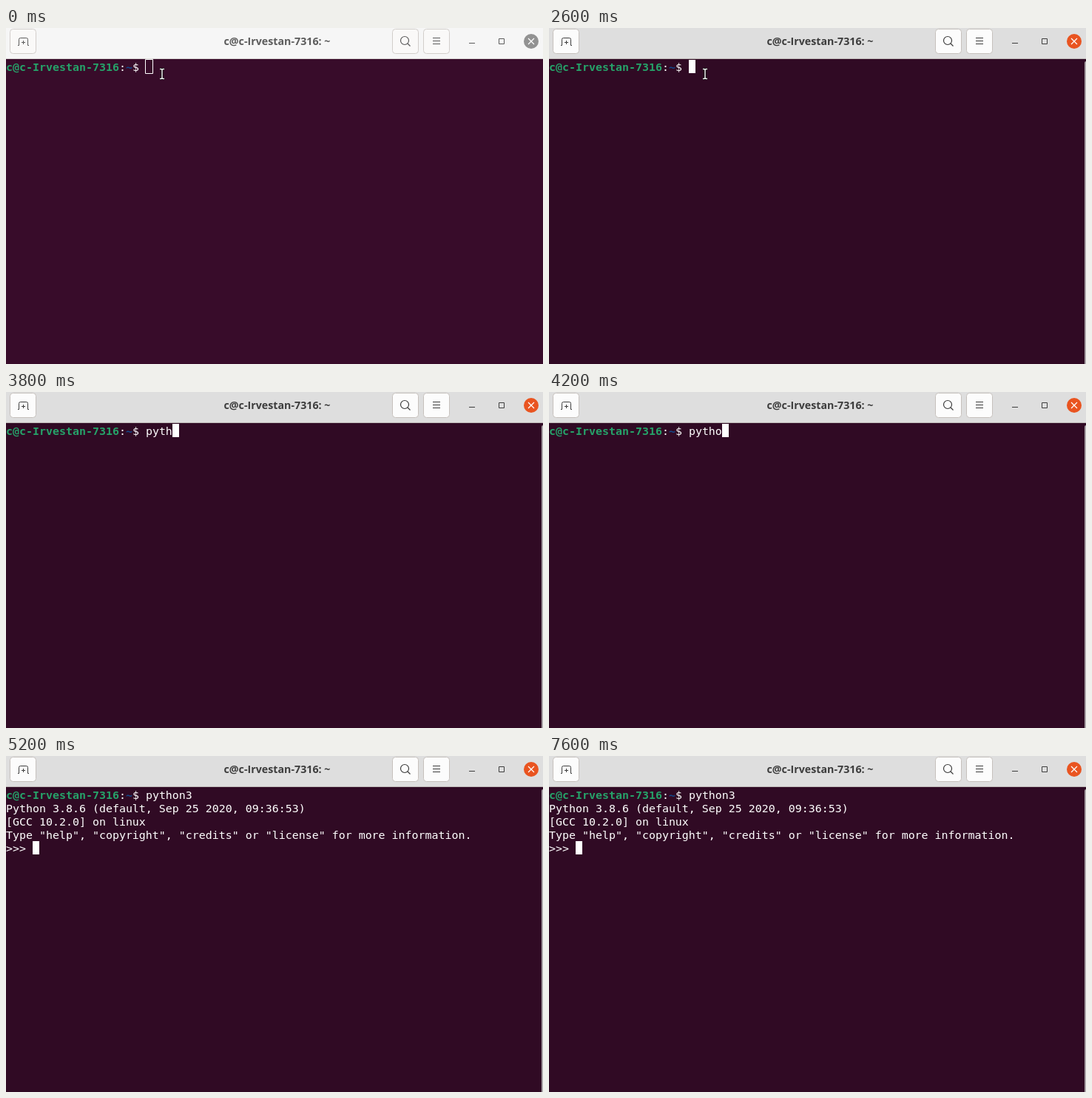
These frames come from a looping animation (726 by 454 pixels, 8 s). An HTML page with a canvas:

```html
<!DOCTYPE html>
<html lang="en">
<head>
<meta charset="utf-8">
<title>Terminal</title>
<style>
  html, body { margin: 0; width: 100%; height: 100%; overflow: hidden; background: #300a24; }
  #stage { position: absolute; left: 0; top: 0; width: 726px; height: 454px; overflow: hidden; }
  canvas { position: absolute; left: 0; top: 0; }
  #title {
    position: absolute; left: 216px; top: 8px; width: 301px;
    font: bold 14.25px/20px "Open Sans", "Noto Sans", sans-serif;
    text-align: center; white-space: pre;
  }
  #screen {
    position: absolute; left: 0; top: 44px; margin: 0; color: #fff;
    font: 14.95px/18px "DejaVu Sans Mono", monospace;
    font-variant-ligatures: none;
  }
  #screen b { color: #26a269; }
  #screen b.path { color: #12488b; }
</style>
</head>
<body>
<div id="stage">
  <canvas id="view" width="726" height="454"></canvas>
  <div id="title">c@c-Irvestan-7316: ~</div>
  <pre id="screen"><b>c@c-Irvestan-7316</b>:<b class="path">~</b>$ <span id="command"></span>
<span id="output"></span></pre>
</div>
<script>
const LOOP = 8000, CELL = 9, ROW = 18, TOP = 43, PROMPT = 21;
const FOCUS = 1500, RUN = 5200;
const COMMAND = 'python3';
const KEY_TIMES = [2800, 3300, 3700, 3800, 4200, 4500, 4800];
const OUTPUT = [
  'Python 3.8.6 (default, Sep 25 2020, 09:36:53)',
  '[GCC 10.2.0] on linux',
  'Type "help", "copyright", "credits" or "license" for more information.',
  '>>> '
].join('\n');

const IDLE = { bg: '#380c2a', bar: '#f6f6f6', edge: '#d8d5d3', rim: '#d2cecb',
               ink: '#5c5c5c', close: '#929292' };
const ACTIVE = { bg: '#300a24', bar: '#dedede', edge: '#bfbab7', rim: '#c6c1bd',
                 ink: '#3d3d3d', close: '#e95420' };

const $ = id => document.getElementById(id);
const ctx = $('view').getContext('2d');

function box(x, y, w, h, color) {
  ctx.fillStyle = color;
  ctx.fillRect(x, y, w, h);
}

function stroke(path, color, width = 1) {
  ctx.strokeStyle = color;
  ctx.lineWidth = width;
  ctx.stroke(new Path2D(path));
}

function button(x, fill, rim) {
  ctx.beginPath();
  ctx.roundRect(x + 0.5, 1.5, 35, 33, 4);
  ctx.fillStyle = fill;
  ctx.fill();
  ctx.strokeStyle = rim;
  ctx.lineWidth = 1;
  ctx.stroke();
}

function drawHeader(t, look) {
  const step = Math.min(2, Math.floor((t - FOCUS) / 100));
  const fill = t < FOCUS ? '#faf9f8' : ['#f8f8f7', '#fafafa', '#fcfcfc'][step];
  box(0, 0, 726, 41, look.bar);
  box(0, 41, 726, 1, look.edge);
  [5, 522, 564].forEach(x => button(x, fill, look.rim));

  const ink = look.ink;
  stroke('M16 23.5H17.5V15.5Q17.5 13.5 19.5 13.5H27.5Q29.5 13.5 29.5 15.5V23.5H31', ink);
  stroke('M21 19.5H26M23.5 17V22', ink);
  stroke('M544.5 17A5.5 5.5 0 1 1 533.5 17A5.5 5.5 0 1 1 544.5 17M543 21L546.5 24.5', ink, 1.2);
  stroke('M577 13.5H587M577 17.5H587M577 21.5H587', ink);
  stroke('M626 20.5H634M666.5 14.5H673.5V21.5H666.5Z', ink);

  ctx.beginPath();
  ctx.arc(710, 18, 10, 0, Math.PI * 2);
  ctx.fillStyle = look.close;
  ctx.fill();
  stroke('M706 14L714 22M714 14L706 22', '#fff', 1.2);
}

function drawScrollbar() {
  ctx.beginPath();
  ctx.roundRect(724, 45, 6, 420, 2);
  ctx.fillStyle = '#a8a1a5';
  ctx.fill();
}

function drawPointer() {
  const beam = 'M208 55.5H210L211 56.5L212 55.5H214M211 56V68M208 68.5H210L211 67.5L212 68.5H214';
  stroke(beam, '#000', 3);
  stroke(beam, '#fff', 1.4);
}

function cursorShown(t) {
  if (t >= RUN) return Math.floor((t - RUN) / 600) % 2 === 0;
  return t < 2000 || t >= 2600;
}

function setText(node, text) {
  if (node.textContent !== text) node.textContent = text;
}

function render(t) {
  const focused = t >= FOCUS, running = t >= RUN;
  const look = focused ? ACTIVE : IDLE;
  const typed = KEY_TIMES.filter(k => k <= t).length;
  const x = (running ? 4 : PROMPT + typed) * CELL;
  const y = TOP + (running ? 4 * ROW : 0);

  box(0, 0, 726, 454, look.bg);
  drawHeader(t, look);
  if (focused) drawScrollbar();
  if (!focused) stroke(`M${x - 0.5} ${y - 0.5}h10v19h-10Z`, '#fff');
  else if (cursorShown(t)) box(x, y, CELL, ROW, '#fff');
  if (!typed) drawPointer();

  $('title').style.color = look.ink;
  setText($('command'), COMMAND.slice(0, typed));
  setText($('output'), running ? OUTPUT : '');
}

const start = performance.now();
function tick() {
  render((performance.now() - start) % LOOP);
  requestAnimationFrame(tick);
}
tick();
</script>
</body>
</html>
```
